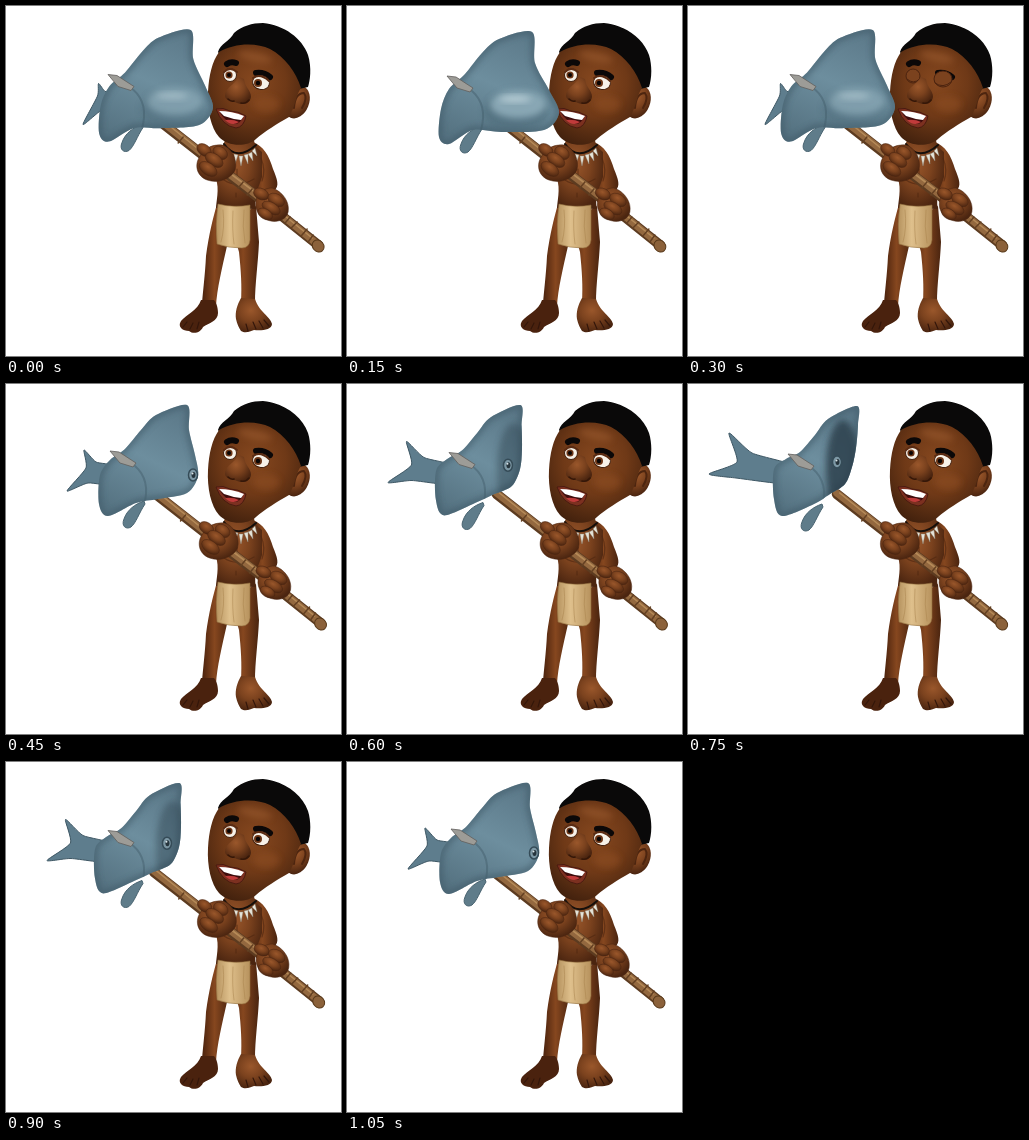
These frames come from a looping animation (335x350 px, 1.2 s). An HTML page:

```html
<!DOCTYPE html>
<html lang="en">
<head>
<meta charset="utf-8">
<title>Fisherman</title>
<style>
  html, body { margin: 0; width: 100%; height: 100%; overflow: hidden; background: #fff; }
  svg { display: block; width: 335px; height: 350px; }
  .soft { filter: url(#blur); }
  .line { fill: none; stroke-linecap: round; stroke-linejoin: round; }
</style>
</head>
<body>
<svg viewBox="0 0 335 350">
  <defs>
    <filter id="blur" x="-50%" y="-50%" width="200%" height="200%"><feGaussianBlur stdDeviation="3"/></filter>
    <radialGradient id="face" cx=".5" cy=".38" r=".68">
      <stop offset="0" stop-color="#86481f"/><stop offset=".5" stop-color="#6f3917"/><stop offset="1" stop-color="#40200d"/>
    </radialGradient>
    <radialGradient id="skin" cx=".42" cy=".36" r=".65">
      <stop offset="0" stop-color="#9a572b"/><stop offset=".5" stop-color="#7b421e"/><stop offset="1" stop-color="#4b2510"/>
    </radialGradient>
    <linearGradient id="limb">
      <stop offset="0" stop-color="#4a220d"/><stop offset=".45" stop-color="#86471f"/><stop offset="1" stop-color="#4a240f"/>
    </linearGradient>
    <linearGradient id="cloth">
      <stop offset="0" stop-color="#b6935f"/><stop offset=".4" stop-color="#dfc08c"/><stop offset="1" stop-color="#b7925d"/>
    </linearGradient>
    <linearGradient id="scales" x1=".75" y1="0" x2=".3" y2="1">
      <stop offset="0" stop-color="#5b7888"/><stop offset=".5" stop-color="#6d8e9e"/><stop offset="1" stop-color="#567382"/>
    </linearGradient>
    <clipPath id="inside"><path class="body"/></clipPath>
  </defs>

  <!-- legs and feet -->
  <path fill="url(#limb)" d="M211 198C207 212 203 228 200 250C199 270 197 284 196 298L210 300C211 283 216 262 221 240L224 205Z"/>
  <path fill="url(#limb)" d="M224 215L233 246C235 265 236 280 235 296L249 297C249 278 252 258 253 236L250 200Z"/>
  <path fill="#4a220e" d="M195 294C192 304 180 309 175 315C171 321 177 325 183 325C188 329 195 326 197 321C203 317 212 315 212 307C212 301 210 296 208 294Z"/>
  <path fill="url(#skin)" d="M235 292C231 299 229 306 230 313C231 318 233 322 235 325C240 328 244 325 248 324C255 325 266 324 266 318C265 311 253 306 249 293Z"/>
  <path class="line" stroke="#33160a" stroke-width="1.2" d="M181 316L177 321M187 317L184 323M193 316L191 323M240 318L242 325M247 316L250 323M253 315L257 322M258 314L263 320"/>

  <!-- torso and arm -->
  <path fill="url(#limb)" d="M247 136C257 140 263 149 267 163C271 173 274 180 268 185L256 194L248 184L254 174L244 150Z"/>
  <path fill="url(#skin)" d="M220 132C216 143 209 150 208 168C214 180 211 190 210 202L250 203C247 190 253 181 256 171L256 146C251 142 248 139 248 133Z"/>
  <path class="line" stroke="#4d250f" stroke-width="1.2" opacity=".6" d="M218 174Q231 183 248 173M231 163V178M230 187V191M255 152Q260 164 256 175"/>
  <path fill="url(#cloth)" stroke="#93703f" stroke-width=".6" d="M212 198Q228 202 244 199L244 234Q243 242 236 242Q222 242 211 238Q209 218 212 198Z"/>
  <path class="line" stroke="#a7824d" opacity=".5" d="M217 204Q219 222 215 236M227 205Q226 224 228 238M238 204Q236 220 239 237"/>

  <!-- necklace -->
  <path class="line" stroke="#150f0b" stroke-width="2" d="M218 138Q231 156 250 139"/>
  <path fill="#e6e4d9" stroke="#8b887c" stroke-width=".4" d="M223 145l4 3l-4 6zM228 148l4 1l-3 9zM233 150h4l-2 10zM238 149l4-1v10zM242 148l4-2l1 9zM246 145l3-3l2 8z"/>

  <!-- head -->
  <ellipse cx="291" cy="96" rx="12" ry="17" transform="rotate(22 291 96)" fill="url(#skin)"/>
  <path class="line" stroke="#4d250f" stroke-width="2" d="M288 102Q289 87 298 87Q302 92 296 102"/>
  <path fill="#0a0909" d="M212 46C214 38 224 35 228 27C236 20 246 17 257 17C278 19 296 32 302 49C306 62 304 75 302 81L293 83L216 52Z"/>
  <path fill="url(#face)" d="M213 46C228 37 250 36 264 43C279 51 290 66 295 82C290 89 289 101 283 111C272 117 258 126 250 133C240 142 221 140 213 131C205 122 201 104 202 86C203 69 206 56 213 46Z"/>
  <ellipse class="soft" cx="249" cy="51" rx="17" ry="5" transform="rotate(12 249 51)" fill="#a05f33" opacity=".5"/>
  <ellipse class="soft" cx="260" cy="98" rx="13" ry="8" fill="#8d4d24" opacity=".6"/>
  <path class="line" stroke="#0b0808" stroke-width="6" d="M221 58Q225 55 230 57"/>
  <path class="line" stroke="#0b0808" stroke-width="6" d="M250 67Q258 66 264 71"/>
  <g id="open">
    <ellipse cx="224" cy="69" rx="6.5" ry="6.5" fill="#f7f2e9" stroke="#42200e"/>
    <ellipse cx="255" cy="76.5" rx="8.5" ry="7" transform="rotate(12 255 76.5)" fill="#f7f2e9" stroke="#42200e"/>
    <circle cx="223" cy="69" r="3.6" fill="#6b3516"/><circle cx="223" cy="69" r="2" fill="#080505"/>
    <circle cx="252" cy="77" r="4" fill="#6b3516"/><circle cx="252" cy="77" r="2.2" fill="#080505"/>
    <path class="line" stroke="#5b2c13" stroke-width="2" d="M218 66Q224 60 231 66M247 72Q254 67 263 75"/>
  </g>
  <g id="shut" stroke="#4b230f" fill="#7b421e">
    <ellipse cx="225" cy="70" rx="7" ry="7"/><ellipse cx="255" cy="73" rx="9" ry="8"/>
    <path class="line" d="M219 73Q225 79 232 73M247 77Q255 83 263 76"/>
  </g>
  <path fill="url(#skin)" d="M233 71C228 79 219 82 219 90C220 96 227 95 231 97C237 99 244 98 245 91C245 84 239 82 238 73Z"/>
  <path class="line" stroke="#351708" stroke-width="1.6" d="M222 93Q225 96 228 95M235 97Q240 98 243 94"/>
  <path fill="#7c3020" stroke="#491b10" d="M210 103Q217 101 224 105Q232 105 240 110Q238 121 230 122Q216 120 210 103Z"/>
  <path fill="#3d0c0c" d="M213 105Q226 106 237 111Q234 118 229 118Q219 116 213 105Z"/>
  <path fill="#fff" d="M213 105Q226 105 238 110L235 114Q226 113 218 110Z"/>
  <path fill="#c03b3b" d="M219 114Q227 113 233 116Q226 121 219 114Z"/>

  <!-- spear and hands -->
  <g id="hold">
    <g class="line">
      <path stroke="#5c3b20" stroke-width="10" d="M147 110L198 150L262 199L312 239"/>
      <path stroke="#93683f" stroke-width="7" d="M147 109L198 149L262 198L311 238"/>
      <path stroke="#b58a58" stroke-width="1.6" d="M150 109L197 147L258 193L306 232"/>
      <path stroke="#644022" stroke-width="1.5" d="M177 131L172 137M237 176L232 182M246 183L241 189M284 211L279 217M291 216L285 222M301 223L295 230M307 229L302 236"/>
    </g>
    <ellipse cx="312" cy="240" rx="6.5" ry="5.5" transform="rotate(50 312 240)" fill="#8b613a" stroke="#573819"/>
    <g fill="url(#skin)" stroke="#4b2511" stroke-width=".5">
      <path d="M194 150C188 158 190 170 201 174C212 178 225 173 229 164C232 154 225 141 216 139C206 138 197 143 194 150Z"/>
      <ellipse cx="198" cy="144" rx="8" ry="5.5" transform="rotate(35 198 144)"/>
      <ellipse cx="214" cy="147" rx="8" ry="6" transform="rotate(35 214 147)"/>
      <ellipse cx="208" cy="154" rx="10" ry="6" transform="rotate(35 208 154)"/>
      <ellipse cx="202" cy="163" rx="10" ry="6" transform="rotate(35 202 163)"/>
      <path d="M252 189C247 197 249 208 259 213C268 218 280 215 282 206C284 196 276 185 266 182C260 182 256 184 252 189Z"/>
      <ellipse cx="255" cy="188" rx="8" ry="5.5" transform="rotate(25 255 188)"/>
      <ellipse cx="270" cy="194" rx="9" ry="6" transform="rotate(30 270 194)"/>
      <ellipse cx="265" cy="202" rx="10" ry="5.5" transform="rotate(30 265 202)"/>
      <ellipse cx="259" cy="208" rx="8" ry="5" transform="rotate(30 259 208)"/>
    </g>
  </g>

  <!-- fish -->
  <g id="fish">
    <path id="tail" fill="#5e7d8d" stroke="#3e5764"/>
    <path fill="#5f7c8a" stroke="#486370" d="M138 117C129 120 121 126 118 135C115 142 120 146 125 143C130 139 133 129 139 120Z"/>
    <path class="body" fill="url(#scales)"/>
    <g clip-path="url(#inside)">
      <path class="body soft line" stroke="#3f5a68" stroke-width="6" opacity=".7"/>
      <g id="cheek">
        <ellipse class="soft" cx="-2" cy="8" rx="33" ry="20" fill="#4a6674" opacity=".45"/>
        <ellipse class="soft" rx="28" ry="14" fill="#94b2bf" opacity=".8"/>
        <ellipse class="soft" cx="-3" cy="-5" rx="16" ry="3" fill="#d0e2e7" opacity=".7"/>
      </g>
      <ellipse id="shade" class="soft" rx="17" ry="48" fill="#2b3d48"/>
      <path class="line" stroke="#405c69" stroke-width="2" opacity=".45" d="M129 82Q145 96 138 121"/>
    </g>
    <g id="eye">
      <ellipse rx="4.5" ry="6" fill="#7d98a5" stroke="#354b57" stroke-width="1.5"/>
      <ellipse cx=".5" rx="2" ry="3" fill="#26343c"/><circle cx="-.5" cy="-1.5" r="1" fill="#dce7ea"/>
    </g>
    <path fill="#9d9c97" stroke="#615f5c" stroke-width=".8" d="M104 67L113 68L130 79L127 83L114 79Z"/>
  </g>
</svg>
<script>
const $ = id => document.getElementById(id);
const bodies = document.querySelectorAll('.body');

// Key points: x, y at mid-swing, then how far each swings either way.
const body = [
  [181, 21, 8, 2], [150, 31, 6, -1], [135, 46, 4, -2], [119, 65, 3, 0],  // fin and back
  [104, 76, 2, 4], [94, 91, 4, 9], [93, 120, 3, 8], [102, 132, 4, 3],    // left flap
  [130, 119, 0, 2], [152, 115, 6, 8], [181, 109, 20, 12],                // belly and jaw
  [192, 92, 24, 12], [189, 71, 17, 10], [183, 46, 9, 8]                  // snout and brow
];
const tail = [
  [108, 82, 0, 4], [90, 78, 22, 12], [78, 66, 33, 20], [80, 84, 27, 9],
  [61, 107, 36, 20], [82, 99, 30, 8], [108, 101, 0, 4]
];
const eye = [187, 91, 34, 16];
const cheek = [161, 90, 14, 5];

const swing = ([x, y, dx, dy], amount) => [x + dx * amount, y + dy * amount];

// Closed smooth curve through the swung points.
function smooth(points, amount, tension) {
  const count = points.length;
  const at = i => swing(points[(i + count) % count], amount);
  let d = `M${at(0)}`;
  for (let i = 0; i < count; i++) {
    const [a, b, c, e] = [at(i - 1), at(i), at(i + 1), at(i + 2)];
    const out = b.map((v, k) => v + (c[k] - a[k]) * tension);
    const into = c.map((v, k) => v - (e[k] - b[k]) * tension);
    d += `C${out} ${into} ${c}`;
  }
  return d + 'Z';
}

const move = (id, x, y) => $(id).setAttribute('transform', `translate(${x} ${y})`);

function draw(step) {
  // 1: head towards the viewer, -1: head turned away. The tail moves at even speed.
  const turn = Math.cos((step - 1) * Math.PI / 4);
  const flick = Math.asin(turn) * 2 / Math.PI;

  const outline = smooth(body, turn, 0.15);
  bodies.forEach(path => path.setAttribute('d', outline));
  $('tail').setAttribute('d', smooth(tail, flick, 0.1));

  const [eyeX, eyeY] = swing(eye, turn);
  move('eye', eyeX, eyeY);
  move('shade', eyeX + 6, eyeY + 6);
  move('cheek', ...swing(cheek, turn));
  $('eye').style.opacity = turn < 0.4 ? 1 : 0;
  $('shade').style.opacity = turn < 0 ? 0.8 * turn * turn : 0;
  $('cheek').style.opacity = Math.max(0, turn);

  // The whole fish dips at both ends of the swing; the spear sways slightly.
  move('fish', -4 * turn * turn, 3 * turn * turn);
  move('hold', 1.3 * (1 - Math.cos((step + 0.6) * Math.PI / 4)), 0);

  const blink = step === 2;
  $('open').style.display = blink ? 'none' : '';
  $('shut').style.display = blink ? '' : 'none';
}

function tick() {
  draw(Math.floor(performance.now() % 1200 / 150));
  requestAnimationFrame(tick);
}
tick();
</script>
</body>
</html>
```
